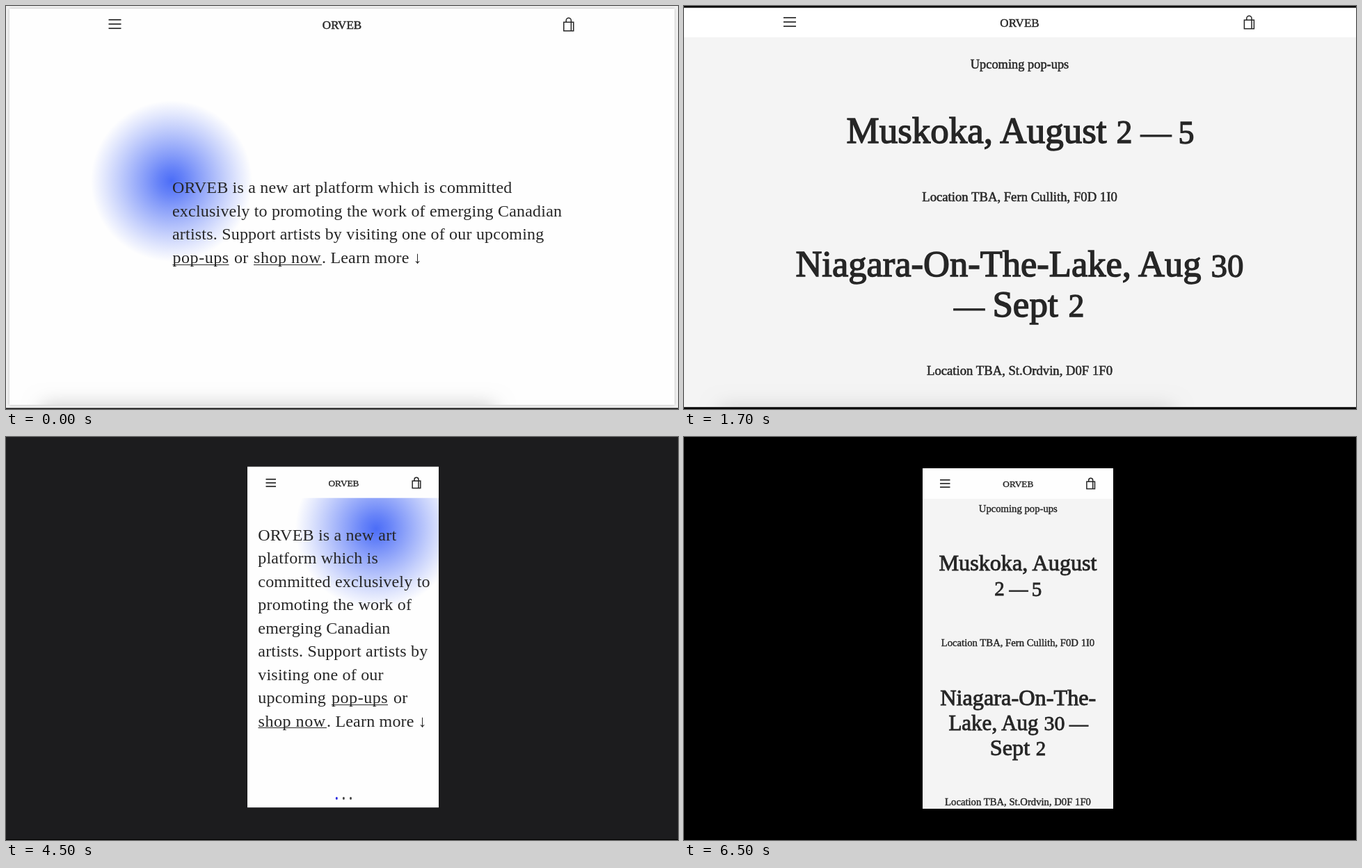
Write an HTML page with a canvas that moves like this. It is 966x580 px and loops after 8 s.

```html
<!DOCTYPE html>
<html lang="en">
<head>
<meta charset="utf-8">
<title>Art platform walkthrough</title>
<style>
html, body { margin: 0; width: 100%; height: 100%; overflow: hidden; background: #fff; }
canvas, svg { position: absolute; left: 0; top: 0; width: 966px; height: 580px; }
text { font-family: "Liberation Serif", "Noto Serif", serif; fill: #262626; white-space: pre; }
.body { font-size: 24px; letter-spacing: .2px; }
.link { letter-spacing: .55px; }
.mid { text-anchor: middle; }
.strong { stroke: #262626; stroke-width: .028em; }
.it { font-style: italic; }
</style>
</head>
<body>
<canvas id="stage" width="966" height="580"></canvas>
<svg id="words" viewBox="0 0 966 580"></svg>
<script>
const W = 966, H = 580, LOOP = 8000, INK = '#262626', GREY = '#f4f4f4';
const c = document.getElementById('stage').getContext('2d');
const svg = document.getElementById('words');
const NS = 'http://www.w3.org/2000/svg';
const BRAND = 'ORVEB', ARTIST = 'Vilma Orlen';

// ---------- text ----------
let layer;
function say(str, x, y, cls, size) {
  const el = document.createElementNS(NS, 'text');
  el.setAttribute('x', x);
  el.setAttribute('y', y);
  el.setAttribute('class', cls);
  if (size) el.style.fontSize = size + 'px';
  el.textContent = str;
  layer.append(el);
}
const title = (str, x, y, size) => say(str, x, y, 'mid strong', size);
const para = (lines, x, y) => lines.forEach((s, i) => say(s, x, y + i * 33.5, 'body'));
const link = (str, x, y) => say(str, x, y, 'body link');

function caption(x, y, name) {
  title(ARTIST, x, y, 13.2);
  say(name, x, y + 16, 'mid it', 13.3);
  say('Sold Out', x, y + 31.7, 'mid', 13.4);
}

// ---------- shapes ----------
function rect(x, y, w, h, color) {
  c.fillStyle = color;
  c.fillRect(x, y, w, h);
}

function line(x1, y1, x2, y2, w = 1.2, color = INK) {
  c.strokeStyle = color;
  c.lineWidth = w;
  c.beginPath();
  c.moveTo(x1, y1);
  c.lineTo(x2, y2);
  c.stroke();
}

function menu(x, y, w, gap) {
  for (const k of [-1, 0, 1]) line(x, y + k * gap, x + w, y + k * gap, 1.7);
}

// Shopping bag; (x, y) is the centre of the body's top edge.
function bag(x, y, s = 1) {
  c.save();
  c.translate(x, y);
  c.scale(s, s);
  c.strokeStyle = INK;
  c.lineWidth = 1.5 / s;
  c.strokeRect(-7, 0, 14, 12.5);
  c.beginPath();
  c.moveTo(3.6, 12.5);
  c.lineTo(3.6, -2.4);
  c.arc(0, -2.4, 3.6, 0, Math.PI, true);
  c.lineTo(-3.6, 0);
  c.stroke();
  c.restore();
}

function glow(x, y, r) {
  const g = c.createRadialGradient(x, y, 0, x, y, r);
  const stops = [.98, .83, .65, .48, .31, .15, 0];
  stops.forEach((a, i) => g.addColorStop(i / 6, `rgba(72,106,247,${a})`));
  c.fillStyle = g;
  c.fillRect(x - r, y - r, 2 * r, 2 * r);
}

// Window shadow along the lower edge
function footShade(y, alpha) {
  c.save();
  c.beginPath();
  c.rect(0, 0, W, y);
  c.clip();
  c.shadowColor = `rgba(0,0,0,${alpha})`;
  c.shadowBlur = 28;
  rect(52, y, 650, 30, '#000');
  c.restore();
}

function page(x, y, right, bottom, edge) {
  rect(0, 0, W, H, edge);
  c.save();
  c.shadowColor = 'rgba(0,0,0,.22)';
  c.shadowBlur = 4;
  rect(x, y, right - x, bottom - y, '#fefefe');
  c.restore();
}

function blob(x, y, rx, ry, rgb, a = 1, turn = 0) {
  c.save();
  c.translate(x, y);
  c.rotate(turn);
  c.scale(rx, ry);
  const g = c.createRadialGradient(0, 0, 0, 0, 0, 1);
  g.addColorStop(0, `rgba(${rgb},${a})`);
  g.addColorStop(.6, `rgba(${rgb},${a * .6})`);
  g.addColorStop(1, `rgba(${rgb},0)`);
  c.fillStyle = g;
  c.fillRect(-1, -1, 2, 2);
  c.restore();
}

function oval(x, y, rx, ry, fill, turn = 0) {
  c.fillStyle = fill;
  c.beginPath();
  c.ellipse(x, y, rx, ry, turn, 0, 7);
  c.fill();
}

function bend(x1, y1, cx, cy, x2, y2, color, w = 1.1) {
  c.strokeStyle = color;
  c.lineWidth = w;
  c.beginPath();
  c.moveTo(x1, y1);
  c.quadraticCurveTo(cx, cy, x2, y2);
  c.stroke();
}

function seeded(s) {
  return () => (s = (s * 16807) % 2147483647) / 2147483647;
}

// Uneven brush line
function wavy(x1, y1, x2, y2, color, w, seed) {
  const rnd = seeded(seed), n = 16;
  for (let k = 0, px = x1, py = y1; k++ < n;) {
    const x = x1 + (x2 - x1) * k / n + rnd() * 1.6 - .8;
    const y = y1 + (y2 - y1) * k / n + rnd() * 1.6 - .8;
    line(px, py, x, y, w * (.5 + rnd()), color);
    px = x;
    py = y;
  }
}

function border(x, y, w, h, color, lw, seed) {
  wavy(x, y, x + w, y, color, lw, seed);
  wavy(x + w, y, x + w, y + h, color, lw, seed + 1);
  wavy(x, y + h, x + w, y + h, color, lw, seed + 2);
  wavy(x, y, x, y + h, color, lw, seed + 3);
}

function hatch(x, y, w, h, n, color, seed) {
  const rnd = seeded(seed);
  for (let i = 0; i < n; i++) {
    const yy = y + h * i / n;
    line(x + rnd() * w * .3, yy, x + w * (.7 + rnd() * .3), yy + (rnd() - .5) * 4, .9, color);
  }
}

function sheet(x, y, w, h, from, to) {
  const g = c.createLinearGradient(x, y, x + w * .4, y + h);
  g.addColorStop(0, from);
  g.addColorStop(1, to);
  c.save();
  c.shadowColor = 'rgba(60,60,70,.45)';
  c.shadowBlur = 2;
  rect(x, y, w, h, g);
  c.restore();
}

// ---------- gallery pictures ----------
function redSheet() {
  const ochre = 'rgba(205,160,100,.6)', rose = 'rgba(205,125,145,.6)';
  sheet(141, 139.5, 215.5, 290, '#e1e3ea', '#e4e4ea');
  border(146, 145, 205, 279, ochre, 1.2, 5);
  border(156, 155, 185, 258, 'rgba(190,180,175,.5)', 1, 9);
  hatch(294, 164, 34, 42, 9, ochre, 3);
  hatch(308, 398, 26, 16, 5, ochre, 8);
  blob(248, 268, 82, 96, '240,237,243', .8);
  blob(246, 370, 64, 46, '240,237,243', .7, -.3);
  blob(216, 222, 34, 7, '203,88,110', .4, -.75);
  blob(294, 256, 8, 34, '205,45,55', .75, -.15);
  blob(316, 245, 6, 48, '215,120,140', .4);
  blob(190, 322, 8, 36, '208,110,132', .35, -.5);
  blob(202, 357, 13, 6, '200,50,70', .6);
  blob(268, 352, 30, 8, '210,110,130', .3, .5);
  blob(224, 400, 22, 6, '203,60,78', .7);
  bend(242, 190, 262, 130, 284, 178, ochre);
  bend(284, 178, 345, 230, 310, 305, rose);
  bend(228, 200, 165, 245, 172, 315, rose);
  bend(172, 315, 190, 360, 250, 330, rose);
  bend(250, 330, 330, 300, 300, 235, rose);
  bend(192, 390, 225, 355, 292, 405, rose);
}

function blueSheet() {
  const blue = '45,68,205', ochre = '196,146,92', tan = `rgba(${ochre},.65)`;
  sheet(376, 138.5, 215, 291, '#d9dce6', '#dddfe6');
  blob(450, 156, 76, 9, blue, .4);
  blob(560, 192, 14, 42, blue, .3, -.4);
  blob(398, 250, 14, 100, '150,165,215', .4);
  blob(420, 372, 20, 26, '110,130,210', .3, -.4);
  border(383, 146, 201, 277, `rgba(${blue},.5)`, 1.2, 12);
  wavy(588, 152, 588, 424, `rgba(${blue},.9)`, 4, 21);
  wavy(378, 427, 588, 427, `rgba(${blue},.6)`, 2, 4);
  hatch(388, 158, 26, 42, 9, `rgba(${blue},.45)`, 7);
  hatch(542, 366, 36, 40, 10, `rgba(${blue},.5)`, 6);
  blob(486, 292, 88, 122, '228,225,226', .95, -.25);
  blob(512, 370, 74, 56, '228,225,226', .9);
  blob(446, 210, 28, 14, ochre, .3, -.4);
  blob(484, 262, 46, 26, '190,170,155', .25, .3);
  blob(450, 345, 12, 62, ochre, .35, -.3);
  blob(528, 304, 32, 14, ochre, .2, .4);
  blob(505, 382, 44, 26, '185,165,148', .35);
  bend(482, 185, 496, 130, 526, 170, tan);
  bend(526, 170, 530, 200, 508, 212, tan);
  bend(482, 175, 425, 190, 416, 220, tan, 1.6);
  bend(416, 220, 400, 300, 448, 412, tan, 1.3);
  bend(440, 226, 440, 310, 474, 405, tan);
  bend(526, 190, 575, 225, 555, 325, tan);
  bend(462, 330, 570, 290, 570, 360, tan);
  bend(570, 360, 550, 420, 470, 412, tan);
}

function framedPicture() {
  sheet(647, 174, 142, 140, '#dcdae0', '#d3d2d8');
  border(656, 183, 124, 122, 'rgba(190,188,198,.6)', 1.2, 14);
  rect(666, 193, 103, 102, '#8f8685');
  rect(668, 197, 99, 96, '#c6bcb9');
  c.save();
  c.beginPath();
  c.rect(668, 197, 99, 96);
  c.clip();
  blob(684, 226, 18, 32, '120,165,190', .6);
  blob(740, 218, 34, 28, '190,150,145', .6);
  blob(752, 256, 10, 28, '145,145,120', .55);
  blob(690, 275, 10, 12, '80,140,190', .6);
  blob(716, 286, 40, 9, '190,140,135', .5);
  blob(716, 246, 27, 28, '216,209,207', 1);
  blob(705, 266, 8, 24, '150,150,120', .5);
  blob(714, 206, 11, 12, '95,160,195', .9);
  blob(716, 228, 12, 12, '100,160,192', .7);
  blob(738, 250, 24, 11, '222,214,212', 1, .4);
  c.restore();
}

function lowerRow() {
  c.save();
  c.beginPath();
  c.rect(0, 0, W, 574);
  c.clip();

  sheet(612, 469.5, 215, 130, '#dbe0ec', '#d8e0ee');
  border(617, 475, 205, 120, 'rgba(135,165,205,.5)', 1, 31);
  c.fillStyle = '#cfbdc6';
  c.beginPath();
  c.roundRect(635, 480, 172, 120, 14);
  c.fill();
  hatch(640, 486, 70, 60, 15, 'rgba(185,145,155,.35)', 17);
  hatch(774, 486, 30, 60, 13, 'rgba(185,145,155,.35)', 18);
  oval(738, 573, 86, 61, '#c5d7e7');
  hatch(676, 528, 124, 46, 14, 'rgba(135,180,212,.4)', 19);
  oval(743, 497, 19, 22, '#d4d3dd');
  blob(699, 558, 24, 22, '225,232,242', .7);

  rect(138, 545, 220, 29, '#353236');
  blob(205, 561, 28, 7, '130,122,115', .6, .2);
  blob(256, 556, 18, 5, '158,132,62', .65, -.4);
  blob(294, 560, 14, 14, '160,85,92', .6);
  blob(334, 556, 22, 6, '125,118,118', .6);
  blob(174, 569, 24, 4, '90,95,110', .6);

  sheet(380, 554, 206, 40, '#d8e0e6', '#d3dfe7');
  border(385, 559, 196, 40, 'rgba(130,165,190,.6)', 1, 37);
  rect(396, 564, 172, 10, '#c3d8e3');
  hatch(396, 564, 172, 10, 4, 'rgba(85,150,185,.6)', 11);
  c.restore();
}

// ---------- scenes ----------
const scenes = [
  {
    end: 500,
    draw() {
      page(5, 4, 961, 574, '#f1f1f1');
      glow(238, 252, 116);
      footShade(574, .2);
      rect(0, 578.5, W, 1.5, '#111');
      menu(147.5, 26, 18, 6.2);
      bag(808.8, 23.3);
      line(239.5, 372.5, 320.5, 372.5);
      line(356, 372.5, 454, 372.5);
    },
    text() {
      title(BRAND, 483, 33, 17);
      para([BRAND + ' is a new art platform which is committed',
        'exclusively to promoting the work of emerging Canadian',
        'artists. Support artists by visiting one of our upcoming'], 239, 269);
      link('pop-ups', 239.5, 369.5);
      say('or', 328, 369.5, 'body');
      link('shop now', 356, 369.5);
      say('. Learn more ↓', 454, 369.5, 'body');
    }
  },
  {
    end: 2500,
    draw() {
      rect(0, 0, W, H, GREY);
      rect(0, 0, W, 45, '#fff');
      footShade(577, .14);
      rect(0, 0, W, 2.5, '#000');
      rect(0, 577.3, W, 2.7, '#000');
      menu(143, 23, 18, 6.2);
      bag(812.4, 20.2);
    },
    text() {
      title(BRAND, 482.5, 30, 17);
      title('Upcoming pop-ups', 482.5, 90, 18.4);
      title('Muskoka, August', 420.5, 197, 53);
      title('2', 633, 197, 46);
      title('—', 678.5, 197, 44);
      title('5', 722, 198, 46);
      title('Location TBA, Fern Cullith, F0D 1I0', 482.5, 281, 18.7);
      title('Niagara-On-The-Lake, Aug', 452, 388.5, 52.5);
      title('30', 781, 390, 47);
      title('—', 410, 446.5, 44);
      title('Sept', 490.5, 446.5, 53);
      title('2', 564, 446.5, 46);
      title('Location TBA, St.Ordvin, D0F 1F0', 482.5, 530.5, 18.7);
    }
  },
  {
    end: 4500,
    draw() {
      page(4, 3, 963, 574, '#f0f0f3');
      redSheet();
      blueSheet();
      framedPicture();
      lowerRow();
      footShade(574, .2);
      rect(56, 578.8, 634, 1.2, '#b8b8bb');
      menu(147, 25.3, 18, 6.2);
      bag(809.8, 22.3);
    },
    text() {
      title(BRAND, 483.5, 32.3, 17);
      caption(248, 470, 'Crinkles 02');
      caption(483, 469.3, 'Crinkles 01');
      caption(718.5, 390.8, 'Slantways 00');
    }
  },
  {
    end: 6500,
    draw() {
      rect(0, 0, W, H, '#1c1c1e');
      rect(0, 579, W, 1, '#000');
      rect(347, 42.7, 275, 490.5, '#fefefe');
      c.save();
      c.beginPath();
      c.rect(347, 87.7, 275, 445);
      c.clip();
      glow(532, 132, 116);
      c.restore();
      menu(373.5, 66, 14.5, 5.2);
      bag(590, 63.2, .83);
      line(468, 385.5, 549, 385.5);
      line(362.5, 418.5, 461, 418.5);
      [['#2a2ae0', 475.3], ['#444', 485.4], ['#444', 495.5]]
        .forEach(([color, x]) => oval(x, 520, 1.5, 2, color));
    },
    text() {
      title(BRAND, 485.5, 70.8, 13.3);
      para([BRAND + ' is a new art', 'platform which is', 'committed exclusively to',
        'promoting the work of', 'emerging Canadian', 'artists. Support artists by',
        'visiting one of our', 'upcoming'], 362.3, 148.7);
      link('pop-ups', 468, 383.2);
      say('or', 557, 383.2, 'body');
      link('shop now', 362.5, 416.7);
      say('. Learn more ↓', 461, 416.7, 'body');
    }
  },
  {
    end: LOOP,
    draw() {
      rect(0, 0, W, H, '#000');
      rect(343, 45, 274, 490, GREY);
      rect(343, 45, 274, 44, '#fefefe');
      menu(368, 67, 14.5, 5.2);
      bag(584.7, 64.2, .83);
    },
    text() {
      title(BRAND, 480.3, 72, 13.3);
      title('Upcoming pop-ups', 480.3, 108, 14.7);
      title('Muskoka, August', 480, 192, 32.2);
      title('2', 453.5, 228, 29);
      title('—', 481, 228, 27);
      title('5', 507, 228.5, 29);
      title('Location TBA, Fern Cullith, F0D 1I0', 480, 301, 14.7);
      title('Niagara-On-The-', 480.3, 385.5, 32.3);
      title('Lake, Aug', 445, 421.5, 31);
      title('30', 532.5, 422, 30);
      title('—', 567.5, 421.5, 27);
      title('Sept', 468.5, 457.5, 32.3);
      title('2', 513, 457.5, 29);
      title('Location TBA, St.Ordvin, D0F 1F0', 480, 530, 14.7);
    }
  }
];

for (const s of scenes) {
  layer = s.layer = document.createElementNS(NS, 'g');
  s.text();
  svg.append(layer);
}

let shown;
function tick() {
  const t = performance.now() % LOOP;
  const now = scenes.find(s => t < s.end);
  if (now !== shown) {
    shown = now;
    c.clearRect(0, 0, W, H);
    now.draw();
    for (const s of scenes) s.layer.style.display = s === now ? '' : 'none';
  }
  requestAnimationFrame(tick);
}
tick();
</script>
</body>
</html>
```
